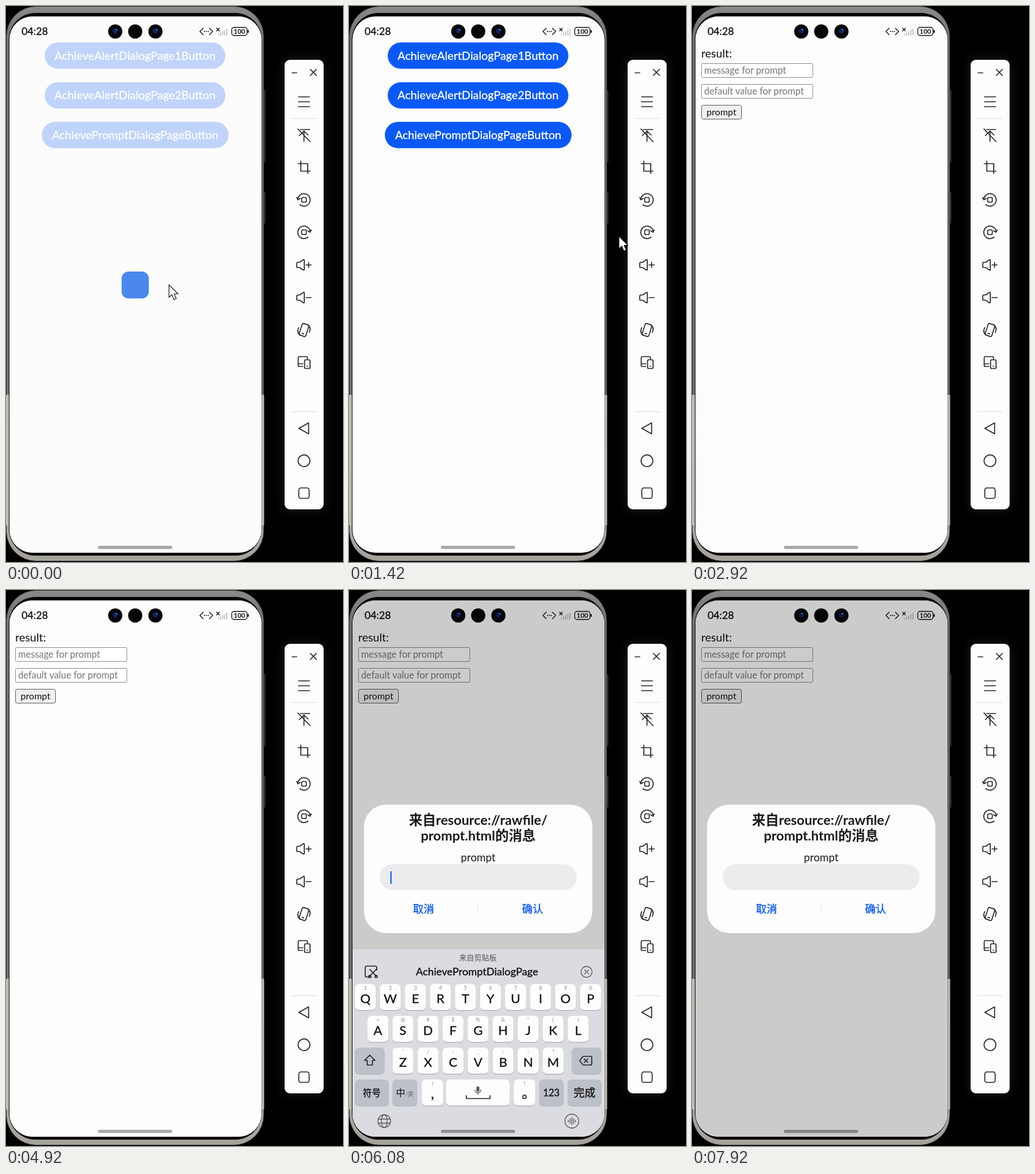
These frames come from a looping animation (583 px wide and 961 px high, 8 s). An HTML page:

```html
<!DOCTYPE html>
<html lang="zh-CN">
<head>
<meta charset="utf-8">
<title>Prompt dialog demo</title>
<style>
  html, body { margin: 0; height: 100%; overflow: hidden; background: #000; }
  svg { display: block; width: 100vw; height: 100vh; }
  text { font-family: Lato, "Noto Sans CJK SC", "Noto Sans CJK", sans-serif; }
  .medium { stroke: currentColor; stroke-width: .35; }
  .line { fill: none; stroke: #222; stroke-width: 1.7; stroke-linecap: round; stroke-linejoin: round; }
  .thin { stroke: #555; stroke-width: 1.3; }
</style>
</head>
<body>
<svg id="stage" viewBox="0 0 583 961"></svg>
<script>
const BLUE = '#0a59f7', PAPER = '#fdfdfd', KEY_GREY = '#bcc0c9';

const rect = (x, y, w, h, r, fill, extra = '') =>
  `<rect x="${x}" y="${y}" width="${w}" height="${h}" rx="${r}" fill="${fill}" ${extra}/>`;
const text = (x, y, size, content, fill = '#111', extra = '') =>
  `<text x="${x}" y="${y}" font-size="${size}" fill="${fill}" color="${fill}" ${extra}>${content}</text>`;
const label = (x, y, size, content, fill, extra = '') =>
  text(x, y, size, content, fill, `text-anchor="middle" ${extra}`);
const medium = (x, y, size, content, fill) => label(x, y, size, content, fill, 'class="medium"');
const line = (d, style = '') => `<path class="line ${style}" d="${d}"/>`;
const outline = (x, y, w, h, r) => rect(x, y, w, h, r, 'none', 'class="line"');
const circle = (x, y, r, extra = 'class="line"') => `<circle cx="${x}" cy="${y}" r="${r}" ${extra}/>`;
const group = (id, content, extra = '') => `<g id="${id}" ${extra}>${content}</g>`;

function phoneBody() {
  return rect(446, 145, 2.5, 125, 1, '#3a3a3a') + rect(446, 322, 2.5, 54, 1, '#3a3a3a') +
    rect(.5, .5, 445.5, 959, 52, 'url(#metal)', 'stroke="#222"') +
    rect(5, 12, 437.5, 938, 46, '#060606') +
    rect(0, 672, 4.5, 226, 1, '#bdb8b2') + rect(442.5, 672, 4, 226, 1, '#bdb8b2');
}

function statusBar() {
  const bars = [0, 1, 2, 3, 4].map(i => rect(367 + i * 3.6, 48 - i * 2.2, 1.6, 3 + i * 2.2, 0, '#bbb')).join('');
  const lens = x => circle(x, 44, 12.3, 'fill="#050507"');
  const glint = x => circle(x, 43, 4.5, 'fill="#10205c"') + circle(x + 2, 41, 1.4, 'fill="#5277c8"');
  return text(27, 50, 17.7, '04:28', '#111', 'class="medium"') +
    [189, 223.5, 258.5].map(lens).join('') + glint(189) + glint(258.5) +
    line('M341 38.5l-5.5 5.5 5.5 5.5M352 38.5l5.5 5.5-5.5 5.5') +
    [343.5, 346.7, 349.9].map(x => circle(x, 44, 1, 'fill="#111"')).join('') +
    bars + line('M364.5 38.5l4.5 4.5M369 38.5l-4.5 4.5') +
    rect(390.5, 37, 26.5, 14, 4, 'none', 'stroke="#111" stroke-width="1.4"') +
    rect(418, 41.5, 2, 5, 1, '#111') +
    label(403.8, 48.3, 11.5, '100', '#111', 'font-weight="700"');
}

function menuPage() {
  const pill = (id, x, y, w, name) => group(id, rect(x, y, w, 45.5, 22.7, BLUE) +
    medium(x + w / 2, y + 29.5, 19.7, name, '#fff'));
  return pill('pill1', 67, 63, 312.5, 'AchieveAlertDialogPage1Button') +
    pill('pill2', 67, 131.7, 312.5, 'AchieveAlertDialogPage2Button') +
    pill('pill3', 62, 200.3, 323, 'AchievePromptDialogPageButton');
}

function webPage() {
  const field = (y, hint) =>
    rect(16.5, y, 192.5, 24, 2, '#fff', 'stroke="#858585"') + text(21, y + 17.5, 16.3, hint, '#757575');
  return text(16, 89, 19.6, 'result:') +
    field(99.5, 'message for prompt') + field(135.5, 'default value for prompt') +
    rect(16.5, 171.5, 69, 24, 3, '#efefef', 'stroke="#555"') + label(51, 189.3, 16, 'prompt');
}

function dialog() {
  const title = (y, content) => label(223.5, y, 23.3, content, '#1a1a1a', 'font-weight="700"');
  return rect(26, 371, 395, 222, 38, PAPER) +
    title(406, '来自resource://rawfile/') + title(433, 'prompt.html的消息') +
    label(223.5, 469, 18.7, 'prompt', '#1a1a1a') +
    rect(53, 474, 341, 45, 22.5, '#ececee') +
    rect(223, 539, 1, 23, 0, '#e6e6e6') +
    medium(129, 557.5, 18.3, '取消', BLUE) + medium(317.5, 557.5, 18.3, '确认', BLUE) +
    group('caret', rect(71.5, 486, 2.2, 22, 1, BLUE));
}

function keyboard() {
  const key = (x, y, w, fill = PAPER) =>
    rect(x, y + 1.5, w, 45, 7, '#b3b6bd') + rect(x, y, w, 45, 7, fill);
  const row = (first, y, letters, hints) => [...letters].map((letter, i) => {
    const x = first + i * 43.3;
    const hint = hints[i].replace('&', '&amp;');
    return key(x - 18, y, 36) + label(x, y + 10, 9, hint, '#888') + medium(x, y + 32.5, 22, letter);
  }).join('');
  const wave = [1.5, 4, 6, 4, 1.5].map((half, i) => `M${379.5 + i * 3} ${918 - half}v${half * 2}`).join('');
  return rect(0, 621, 446, 340, 0, '#dbdce1') +
    label(223, 640, 13, '来自剪贴板', '#555') +
    medium(221.5, 665.5, 18.2, 'AchievePromptDialogPage') +
    line('M37 669h-6a3 3 0 0 1-3-3v-13a3 3 0 0 1 3-3h14a3 3 0 0 1 3 3v4M36 656l11 11M47 656l-11 11') +
    circle(36, 668, 2) + circle(47, 668, 2) +
    circle(411, 660, 9.5, 'class="line thin"') +
    line('M407.5 656.5l7 7M414.5 656.5l-7 7', 'thin') +
    row(28.2, 681, 'QWERTYUIOP', '1234567890') +
    row(50, 736, 'ASDFGHJKL', '~@#$%&*()') +
    row(93.4, 791, 'ZXCVBNM', "'/-_:;?") +
    key(10, 791, 51.5, KEY_GREY) + key(385, 791, 51.5, KEY_GREY) +
    line('M36 804l-9 9h4.5v8h9v-8h4.5z') +
    line('M405 806h13a2 2 0 0 1 2 2v11a2 2 0 0 1-2 2h-13l-6-7.5zM407 810.5l6 6M413 810.5l-6 6') +
    key(10, 846, 59, KEY_GREY) + key(75, 846, 43, KEY_GREY) + key(126, 846, 37) +
    key(168, 846, 110) + key(285, 846, 37) + key(329, 846, 42.5, KEY_GREY) + key(378, 846, 59, KEY_GREY) +
    medium(39.5, 874.5, 15.5, '符号') +
    label(96.5, 875, 16, '中<tspan font-size="10" fill="#666">/英</tspan>') +
    label(144.5, 879, 23, ',', '#111', 'font-weight="700"') + label(144.5, 857, 9, '!', '#888') +
    circle(303.5, 876, 3) + label(303.5, 857, 9, '?', '#888') +
    rect(220.5, 858, 5, 9, 2.5, '#555') + line('M218 864a5 5 0 0 0 10 0M223 869v3', 'thin') +
    line('M203 874v5h41v-5') +
    medium(350, 874.5, 16.5, '123') + medium(407.5, 875.5, 19, '完成') +
    circle(61, 918, 11, 'class="line thin"') + '<ellipse class="line thin" cx="61" cy="918" rx="5" ry="11"/>' +
    line('M50.5 914.5h21M50.5 921.5h21', 'thin') +
    circle(385.5, 918, 12, 'class="line thin"') + line(wave, 'thin');
}

function toolbar() {
  const icon = (y, content) => `<g transform="translate(515.5 ${y})">${content}</g>`;
  const spin = outline(-4, -4, 8, 8, 2) +
    line('M-10.5-2.5A10.8 10.8 0 1 1-7 8.5') + line('M-12.5-4l2 4 4-2.5');
  const speaker = line('M-11.5-4.5h4l6.5-4.5q1.5-.5 1.5 1v16q0 1.5-1.5 1l-6.5-4.5h-4q-1 0-1-1v-6.500q0-1 1-1z');
  return rect(482, 93, 67.5, 777, 9, PAPER, 'filter="url(#glow)"') + rect(482, 93, 67.5, 777, 9, PAPER) +
    line('M495 115.5h8M526.5 109.5l10.5 10.5M537 109.5l-10.5 10.5') +
    icon(165.5, line('M-9.5-8.5h19M-9.5 0h19M-9.5 8.5h19')) +
    rect(494, 194, 44, 1, 0, '#ddd') + rect(494, 700.5, 44, 1, 0, '#ddd') +
    icon(223, line('M-6-9.5h16M-10.5-10.5l21 22M0-7v18M-8 1l8-8 7 7')) +
    icon(279, line('M-10-6.5h16.5v17M-5.5-11v17.5h16')) +
    icon(335, spin) +
    icon(391, `<g transform="scale(-1 1)">${spin}</g>`) +
    icon(447.5, speaker + line('M3.5 0h9M8-4.5v9')) +
    icon(504, speaker + line('M3.5 0h9')) +
    icon(560, `<g transform="rotate(18)">${outline(-6, -10.5, 12, 21, 2.5)}${line('M-1.5 6.5h3')}</g>` +
      line('M-9-4c-2.5 4-2 9 2 13M9 4c2.5-4 2-9-2-13')) +
    icon(616, line('M-2 7h-6a2 2 0 0 1-2-2v-13a2 2 0 0 1 2-2h12a2 2 0 0 1 2 2v2M-10 2.5h8') +
      outline(1, -4.5, 9.5, 15, 2) + line('M5.2 6.5h1')) +
    icon(730, line('M-9 0l17-9.5v19z')) +
    icon(786, circle(0, 0, 10.2)) +
    icon(842, outline(-9, -9, 18, 18, 3.5));
}

const stage = document.getElementById('stage');
const blank = rect(6, 18, 436, 927, 0, PAPER);
stage.innerHTML = `<defs>
  <linearGradient id="metal" x2="0" y2="1"><stop offset="0" stop-color="#8a8a8a"/><stop offset=".06" stop-color="#707070"/>
    <stop offset=".7" stop-color="#707070"/><stop offset=".7" stop-color="#bdb8b2"/><stop offset="1" stop-color="#a5a19c"/></linearGradient>
  <filter id="glow" x="-1" y="-.1" width="3" height="1.2"><feGaussianBlur stdDeviation="10"/>
    <feComponentTransfer><feFuncA type="linear" slope=".12"/></feComponentTransfer></filter>
  <clipPath id="screen">${rect(6, 18, 436, 927, 40, '#fff')}</clipPath>
</defs>
${rect(0, 0, 583, 961, 0, '#000')}
${phoneBody()}
<g clip-path="url(#screen)">
  ${blank}
  ${group('menu', menuPage())}
  ${group('web', blank + group('form', webPage()))}
  ${group('splash', blank)}
  ${group('appIcon', rect(200, 459, 47, 46.5, 12, '#4a88ee'))}
  ${statusBar()}
  ${group('mask', rect(6, 18, 436, 927, 0, '#000'))}
  ${group('dialog', dialog())}
  ${group('keyboard', keyboard())}
  ${rect(159, 933, 128.5, 5.5, 2.7, '#000', 'opacity=".34"')}
</g>
${toolbar()}
${group('cursor', '<path d="M0 0v21.5l5-4.5 3.5 8.5 4-1.7-3.5-8.3h6.5z" fill="#fff" stroke="#111" stroke-width="1.2"/>')}`;

const part = Object.fromEntries([...stage.querySelectorAll('g[id]')].map(g => [g.id, g]));
const progress = (t, from, to) => Math.min(1, Math.max(0, (t - from) / (to - from)));
const easeOut = (p, power = 3) => 1 - (1 - p) ** power;
const easeInOut = p => p * p * (3 - 2 * p);
const move = (g, x, y = 0) => g.setAttribute('transform', `translate(${x} ${y})`);
const fade = (g, opacity) => g.setAttribute('opacity', opacity);

// time, x, y of the pointer tip
const pointerPath = [[0, 282, 482], [150, 282, 482], [750, 559, 440], [1100, 550, 420],
  [1420, 467, 398], [1800, 320, 226], [1950, 320, 226], [2480, 590, 300]];

function pointerAt(t) {
  const next = pointerPath.findIndex(point => point[0] > t);
  if (next < 0) return pointerPath.at(-1).slice(1);
  const [t0, x0, y0] = pointerPath[next - 1], [t1, x1, y1] = pointerPath[next];
  const p = easeInOut(progress(t, t0, t1));
  return [x0 + (x1 - x0) * p, y0 + (y1 - y0) * p];
}

function draw(t) {
  const launch = progress(t, 0, 330);
  fade(part.splash, .75 * (1 - launch));
  fade(part.appIcon, 1 - launch);
  fade(part.pill3, t > 1850 && t < 1970 ? .9 : 1);
  move(part.cursor, ...pointerAt(t));

  const slide = easeOut(progress(t, 1970, 2400));
  move(part.menu, -130 * slide);
  move(part.web, 442 * (1 - slide));
  fade(part.form, t >= 2330 ? 1 : 0);

  const opening = progress(t, 5450, 5650), shown = easeOut(opening, 2);
  const scale = .9 + .1 * easeOut(opening);
  fade(part.mask, .2 * shown);
  fade(part.dialog, shown);
  part.dialog.setAttribute('transform', `translate(223.5 482) scale(${scale}) translate(-223.5 -482)`);

  const raised = easeOut(progress(t, 5750, 5980)) - easeInOut(progress(t, 7050, 7270));
  move(part.keyboard, 0, 330 * (1 - raised));
  fade(part.caret, t > 5750 && t < 7050 && (t - 5750) % 1000 < 500 ? 1 : 0);
}

function tick() {
  draw(performance.now() % 8000);
  requestAnimationFrame(tick);
}
tick();
</script>
</body>
</html>
```
